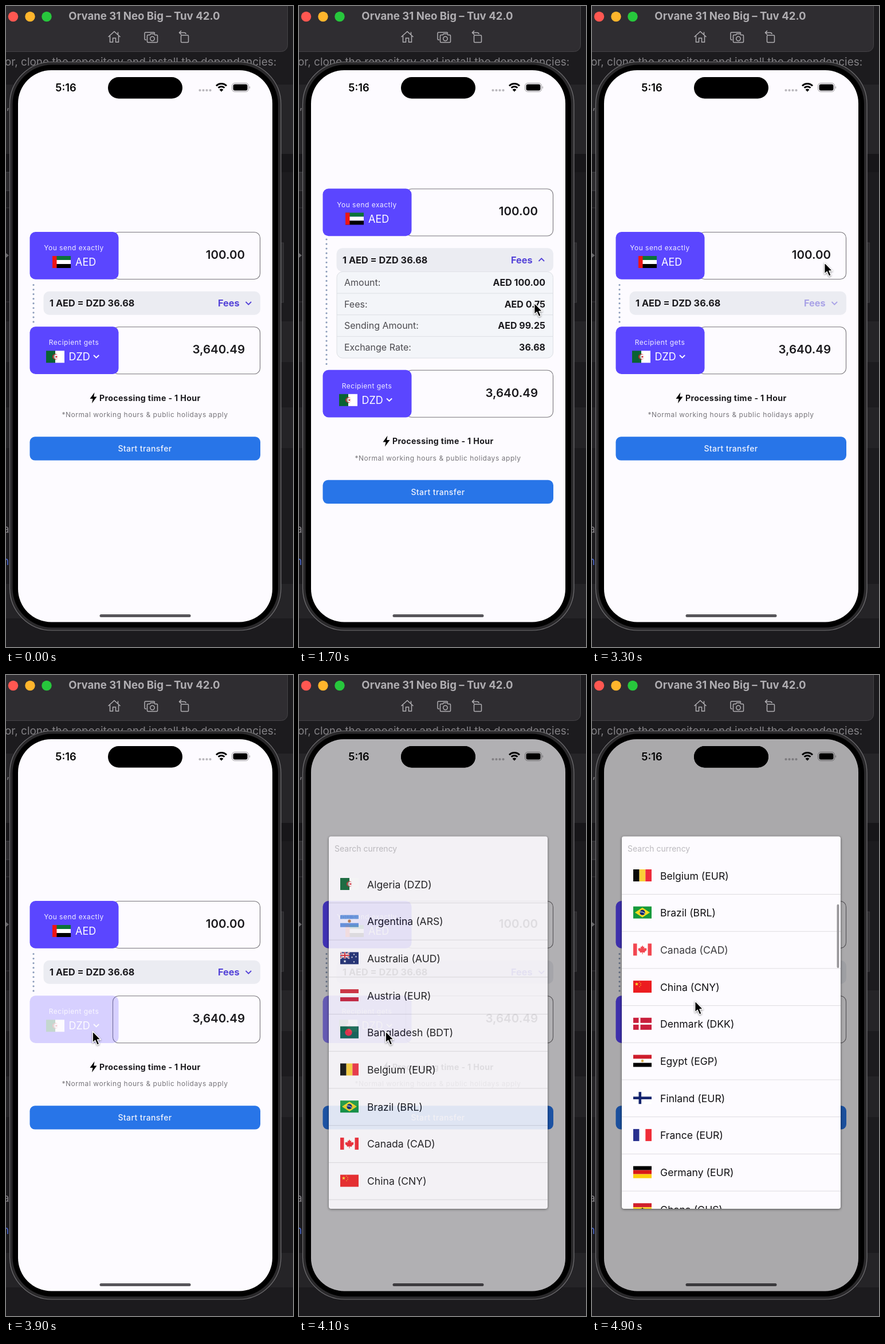
Recreate the animation shown at these times as an HTML page. Size 501x1118 px, loop 5 s.

```html
<!DOCTYPE html>
<html lang="en">
<head>
<meta charset="utf-8">
<title>Currency transfer</title>
<style>
html, body { margin: 0; width: 100%; height: 100%; overflow: hidden; background: #1c1b1e; }
svg { display: block; width: 501px; height: 1118px; }
text { font-family: Inter, "Open Sans", sans-serif; white-space: pre; }
</style>
</head>
<body>
<svg id="stage" viewBox="0 0 501 1118"></svg>
<script>
const LOOP = 5000, ROW = 64.7, SHIFT = 75.5;
const WHITE = '#fdfbff', INK = '#1a191d', PURPLE = '#5b46ff', RED = '#d4202c';

// Drawing helpers: each returns SVG markup
const rect = (x, y, w, h, fill, r = 0, more = '') =>
  `<rect x="${x}" y="${y}" width="${w}" height="${h}" rx="${r}" fill="${fill}" ${more}/>`;
const dot = (x, y, r, fill) => `<circle cx="${x}" cy="${y}" r="${r}" fill="${fill}"/>`;
const line = (d, color, width = 1, more = '') =>
  `<path d="${d}" fill="none" stroke="${color}" stroke-width="${width}" ${more}/>`;
const shape = (d, fill, more = '') => `<path d="${d}" fill="${fill}" ${more}/>`;
const group = (id, body, more = '') => `<g id="${id}" ${more}>${body}</g>`;
const at = (x, y, body) => `<g transform="translate(${x} ${y})">${body}</g>`;
const label = (x, y, size, str, fill, weight = 400, anchor = 'start', gap = 0) =>
  `<text x="${x}" y="${y}" font-size="${size}" fill="${fill}" font-weight="${weight}" ` +
  `text-anchor="${anchor}" letter-spacing="${gap}">${str}</text>`;

// Flags are 32 by 21
const across = (...c) => c.map((f, i) => rect(0, i * 21 / c.length, 32, 21 / c.length, f)).join('');
const down = (...c) => c.map((f, i) => rect(i * 32 / c.length, 0, 32 / c.length, 21, f)).join('');
const cross = (bg, fg, w) => rect(0, 0, 32, 21, bg) + rect(9.5, 0, w, 21, fg) + rect(0, 10.5 - w / 2, 32, w, fg);
const star = (x, y, r, fill) => {
  const pts = Array.from({ length: 10 }, (_, i) => {
    const a = i * Math.PI / 5, q = i % 2 ? r * .4 : r;
    return [x + q * Math.sin(a), y - q * Math.cos(a)].map(v => v.toFixed(2));
  });
  return `<polygon points="${pts.join(' ')}" fill="${fill}"/>`;
};
const jack = rect(0, 0, 16, 11, '#14246e') +
  line('M0 0L16 11M16 0L0 11', '#fff', 2.4) + line('M0 0L16 11M16 0L0 11', RED, .8) +
  line('M8 0V11M0 5.5H16', '#fff', 3.6) + line('M8 0V11M0 5.5H16', RED, 2);
const leaf = 'M16 3l1.6 3 1.7-.8-.6 4 2.2-2 .5 1.3 2.3-.3-.9 2.4 1 .6-3.8 3.1.4 1.5-3.9-.5v3.2h-1v-3.2l-3.9.5.4-1.5-3.8-3.1 1-.6-.9-2.4 2.3.3.5-1.3 2.2 2-.6-4 1.7.8z';
const flags = {
  algeria: down('#0a6233', '#fff') + dot(16, 10.5, 5, RED) + dot(17.3, 10.5, 4, '#fff') +
    rect(12.2, 5.5, 3.8, 10, '#0a6233', 0, 'opacity=".35"') + star(18, 10.5, 2.6, RED),
  emirates: across('#0c7339', '#fff', '#000') + rect(0, 0, 7.5, 21, '#ee1515'),
  argentina: across('#6c9fe0', '#fff', '#6c9fe0') + dot(16, 10.5, 2.6, '#c8894c'),
  australia: rect(0, 0, 32, 21, '#14246e') + jack + star(8, 16, 2.8, '#fff') +
    [[24, 4], [20.5, 9], [27.5, 8], [24, 17]].map(p => star(...p, 1.8, '#fff')).join(''),
  austria: across('#cf2436', '#fff', '#cf2436'),
  bangladesh: rect(0, 0, 32, 21, '#0f6650') + dot(14.5, 10.5, 6.2, '#f02d42'),
  belgium: down('#090909', '#fbd038', '#ee2c3c'),
  brazil: rect(0, 0, 32, 21, '#169a3c') + shape('M3 10.5L16 2l13 8.5L16 19z', '#fbdc20') +
    dot(16, 10.5, 4.6, '#12276f') + line('M11.7 9.4Q16 8.8 20.1 12', '#fff', 1),
  canada: rect(0, 0, 32, 21, '#fff') + rect(0, 0, 6.5, 21, '#f0202c') + rect(25.5, 0, 6.5, 21, '#f0202c') + shape(leaf, '#f0202c'),
  china: rect(0, 0, 32, 21, '#ec1c20') + star(6, 6, 3.4, '#fbe02c') +
    [[11, 2.5], [13, 5], [13, 8], [11, 10.5]].map(p => star(...p, 1.2, '#fbe02c')).join(''),
  denmark: cross('#c91f3d', '#fff', 3),
  egypt: across('#ce1d2c', '#fff', '#000') + rect(14, 8.2, 4, 4.6, '#d8b252', 1),
  finland: cross('#fff', '#14246e', 4.6),
  france: down('#28308e', '#fff', '#f02d38'),
  germany: across('#000', '#d91a18', '#fccf0c'),
  ghana: across('#d01f2c', '#fbd220', '#0d6c3a') + star(16, 10.5, 3.6, '#000')
};
const countries = ['Algeria (DZD)', 'Argentina (ARS)', 'Australia (AUD)', 'Austria (EUR)', 'Bangladesh (BDT)',
  'Belgium (EUR)', 'Brazil (BRL)', 'Canada (CAD)', 'China (CNY)', 'Denmark (DKK)', 'Egypt (EGP)',
  'Finland (EUR)', 'France (EUR)', 'Germany (EUR)', 'Ghana (GHS)'];

function desktop() {
  const bands = [[137, 121, '#262528'], [258, 32, '#171619'], [550, 71, '#252427'], [700, 71, '#242326'], [1008, 60, '#252427']];
  const grey = '#b0aeb2';
  return rect(0, 0, 501, 1118, '#1c1b1e') + bands.map(([y, h, c]) => rect(0, y, 501, h, c)).join('') +
    rect(-5, 290, 20, 32, '#2c2b2e', 0, 'stroke="#454448"') + rect(-5, 352, 20, 164, '#19181b', 0, 'stroke="#38373a"') +
    rect(470, 413, 14.5, 104, '#2c2b2e', 0, 'stroke="#3a393c"') +
    shape('M0 431l5 4-5 4z', '#68676a') + label(1, 180, 18, ',', '#858387') +
    label(-5, 919, 19, 'a', '#858387') + label(-6, 975, 19, 'n', '#4a68d0') +
    label(-2, 104, 18.95, 'or, clone the repository and install the dependencies:', '#828084') +
    rect(-20, -20, 511.5, 99.5, '#2f2d31', 11, 'stroke="#454347"') +
    dot(12.5, 18.5, 8.7, '#ff5751') + dot(42, 18.5, 8.7, '#ffb52c') + dot(71, 18.5, 8.7, '#27c73c') +
    label(241.5, 24, 18.6, 'Orvane 31 Neo Big – Tuv 42.0', grey, 700, 'middle') +
    line('M178.5 54L189 44.5 199.5 54M181.5 52V63H186.5V56H191.5V63H196.5V52M195.5 50V45.5', grey, 1.5) +
    line('M245 59H243.5Q242 59 242 57.5V47.5Q242 46 243.5 46H258Q259.5 46 259.5 48', grey, 1.5) +
    line('M248 50.5H251L252.5 48.5H258.5L260 50.5H263Q264.5 50.5 264.5 52V62Q264.5 63.5 263 63.5H248Q246.5 63.5 246.5 62V52Q246.5 50.5 248 50.5Z', grey, 1.5) +
    `<circle cx="255.5" cy="57" r="3.7" fill="none" stroke="${grey}" stroke-width="1.5"/>` +
    rect(305.5, 51, 13, 12.5, 'none', 1.5, `stroke="${grey}" stroke-width="1.5"`) +
    line('M306 43L302.5 46.5 306 50M302.5 46.5H311Q314 46.5 314 49', grey, 1.5);
}

const island = rect(178, 124, 130, 37.5, '#000', 18.75);
function phone() {
  const arc = (r, w) => line(`M${376 - r * .72} ${148 - r * .7}A${r} ${r} 0 0 1 ${376 + r * .72} ${148 - r * .7}`, '#000', w);
  return rect(6.5, 97.5, 473.5, 991.5, '#2a292b', 74, 'stroke="#737275" stroke-width="1.2"') +
    rect(11.5, 102.5, 463.5, 981.5, '#000', 69) + rect(21, 112, 444, 962.5, WHITE, 58) +
    label(104.5, 149, 18.3, '5:16', '#000', 600, 'middle') + island +
    [338.5, 344.5, 350.5, 356.5].map(x => dot(x, 147, 2.1, '#b9b7bc')).join('') +
    arc(12.5, 3) + arc(7.5, 3) + shape('M376 149.5l-3.4-3.6q3.4-2.6 6.8 0z', '#000') +
    rect(394.5, 134.5, 29, 15, 'none', 4.8, 'stroke="#99979b"') + rect(396.5, 136.5, 25, 11, '#000', 3) +
    shape('M425 139.5q2.2 2.5 0 5z', '#99979b') + rect(163.5, 1061, 159, 5, '#57555a', 2.5);
}

const amountBox = (y, value) => rect(186.5, y + .5, 257, 82, WHITE, 10, 'stroke="#77757a" stroke-width="1.1"') +
  label(417, y + 46.8, 20.5, value, INK, 600, 'end');
const tag = (y, title, flagX, flag, codeX, code) => rect(41.5, y, 155, 82.7, PURPLE, 10) +
  label(118.5, y + 32, 12, title, '#f0edff', 400, 'middle', .5) +
  at(flagX, y + 42, flag) + label(codeX, y + 59, 18, code, '#fff');

function form() {
  const fees = [['Amount:', 'AED 100.00'], ['Fees:', 'AED 0.75'], ['Sending Amount:', 'AED 99.25'], ['Exchange Rate:', '36.68']];
  const panel = rect(66, 539, 377.5, 150.5, '#f3f5f9', 10, 'stroke="#dcdfe4"') +
    fees.map(([name, value], i) => {
      const y = 539 + i * 37.6;
      return (i ? line(`M66 ${y}H443.5`, '#dcdfe4') : '') +
        label(79, y + 24.5, 16, name, '#4b4a4f') + label(430, y + 24.5, 16, value, INK, 700, 'end');
    }).join('');
  return line('', '#8b9cba', 3.2, 'id="dots" stroke-linecap="round" stroke-dasharray="0 8.05"') +
    group('upper', amountBox(394, '100.00') + tag(394, 'You send exactly', 81, flags.emirates, 121, 'AED') +
      group('panel', panel) + rect(65.5, 497.7, 378.5, 41, '#ebecf2', 10) +
      label(76, 524, 16.3, '1 AED = DZD 36.68', INK, 700) +
      group('fees', label(370, 524, 16.3, 'Fees', '#5443d8', 700) + line('', '#5443d8', 1.8, 'id="chevron"'))) +
    group('lower', amountBox(559.3, '3,640.49') +
      group('recipient', tag(559.3, 'Recipient gets', 70, flags.algeria, 109.5, 'DZD') + line('M153 609l4.6 4.5 4.6-4.5', '#fff', 1.8)) +
      shape('M154.5 674l-8 11h5l-1.5 8 8.5-11.5h-5.3z', '#000') +
      label(163, 688.5, 14.2, 'Processing time - 1 Hour', INK, 700, 'start', .35) +
      label(242.5, 717, 12, '*Normal working hours &amp; public holidays apply', '#77757a', 400, 'middle', .55) +
      rect(41.5, 751.3, 402.5, 41.3, '#2875e8', 9) +
      label(242.5, 777, 14, 'Start transfer', '#f0f3fd', 500, 'middle', .4));
}

function picker() {
  const rows = countries.map((name, i) => group('row' + i,
    at(72, 354 + i * ROW, flags[name.split(' ')[0].toLowerCase()]) + label(119, 371.5 + i * ROW, 17.6, name, '#111013')) +
    line(`M52 ${397.5 + i * ROW}H434`, '#dedce0')).join('');
  return group('scrim', rect(21, 112, 444, 962.5, '#000', 58, 'opacity=".33"') + island) +
    group('card', rect(52, 281.5, 382, 649.5, WHITE, 4, 'style="filter:drop-shadow(0 1px 2px #0008)"') +
      label(62, 307.5, 14, 'Search currency', '#bcbabf') +
      `<g clip-path="url(#view)">${group('list', rows)}</g>` + group('thumb', rect(427.5, 333, 3.8, 111, '#98969a', 1.9)));
}

document.getElementById('stage').innerHTML =
  `<clipPath id="view"><rect x="52" y="333" width="382" height="598" rx="4"/></clipPath>` +
  desktop() + phone() + form() + picker() +
  group('cursor', shape('M.8 1.5V21.3L5.2 17.3 8.7 25.2 12.2 23.6 8.9 16H14.9Z', '#000',
    'stroke="#fff" stroke-width="1.3" stroke-linejoin="round"'), 'style="filter:drop-shadow(0 1px 1.5px #0007)"');

// Keyframes: [time, value, ...]
const tracks = {
  cursor: [[300, 447, 640], [900, 410, 516.5], [1700, 410, 516.5], [2300, 405, 446], [3300, 405, 446],
    [3700, 150.5, 620], [4200, 150.5, 620], [4500, 183, 812], [4800, 179, 567]],
  fees: [[1000, 1], [1100, .2], [1300, .2], [1400, .45], [1600, 1], [3000, 1], [3100, .2], [3200, .2], [3300, .43], [3500, 1]],
  recipient: [[3700, 1], [3900, .23], [4000, .35], [4200, 1]],
  scrim: [[3900, 0], [4000, .45], [4100, .9], [4200, 1]],
  card: [[3900, 0], [4000, .43], [4100, .87], [4200, 1]],
  scroll: [[4500, 0], [4600, 64], [4700, 181], [4800, 268], [4900, 338.5]],
  thumb: [[4500, 0], [4600, 1]],
  row7: [[4500, 1], [4600, .45], [4700, .35], [4900, .82]]
};
const linear = k => k, smooth = k => k * k * (3 - 2 * k);
function sample(keys, t, ease = linear) {
  const i = keys.findIndex(k => k[0] > t);
  if (i < 1) return keys.at(i).slice(1);
  const [a, b] = [keys[i - 1], keys[i]];
  const k = ease((t - a[0]) / (b[0] - a[0]));
  return a.slice(1).map((v, n) => v + (b[n + 1] - v) * k);
}

const el = id => document.getElementById(id);
const move = (id, x, y) => el(id).setAttribute('transform', `translate(${x} ${y})`);

function draw(now) {
  const t = Math.floor(now % LOOP / 100) * 100; // ten pictures a second
  const open = t >= 1400 && t < 3200, shift = open ? SHIFT : 0;
  move('upper', 0, -shift);
  move('lower', 0, shift);
  el('panel').style.display = open ? '' : 'none';
  el('dots').setAttribute('d', `M48 ${486.5 - shift - (open ? 4 : 0)}V${554 + shift}`);
  el('chevron').setAttribute('d', open ? 'M418.5 520.5l4.8-4.7 4.8 4.7' : 'M418.5 516l4.8 4.7 4.8-4.7');
  for (const id of ['fees', 'recipient', 'scrim', 'card', 'thumb', 'row7']) el(id).style.opacity = sample(tracks[id], t)[0];
  const [scroll] = sample(tracks.scroll, t);
  move('list', 0, -scroll);
  move('thumb', 0, scroll * .198);
  move('cursor', ...sample(tracks.cursor, t, smooth));
  el('cursor').style.display = t < 300 ? 'none' : '';
  requestAnimationFrame(() => draw(performance.now()));
}
draw(performance.now());
</script>
</body>
</html>
```
